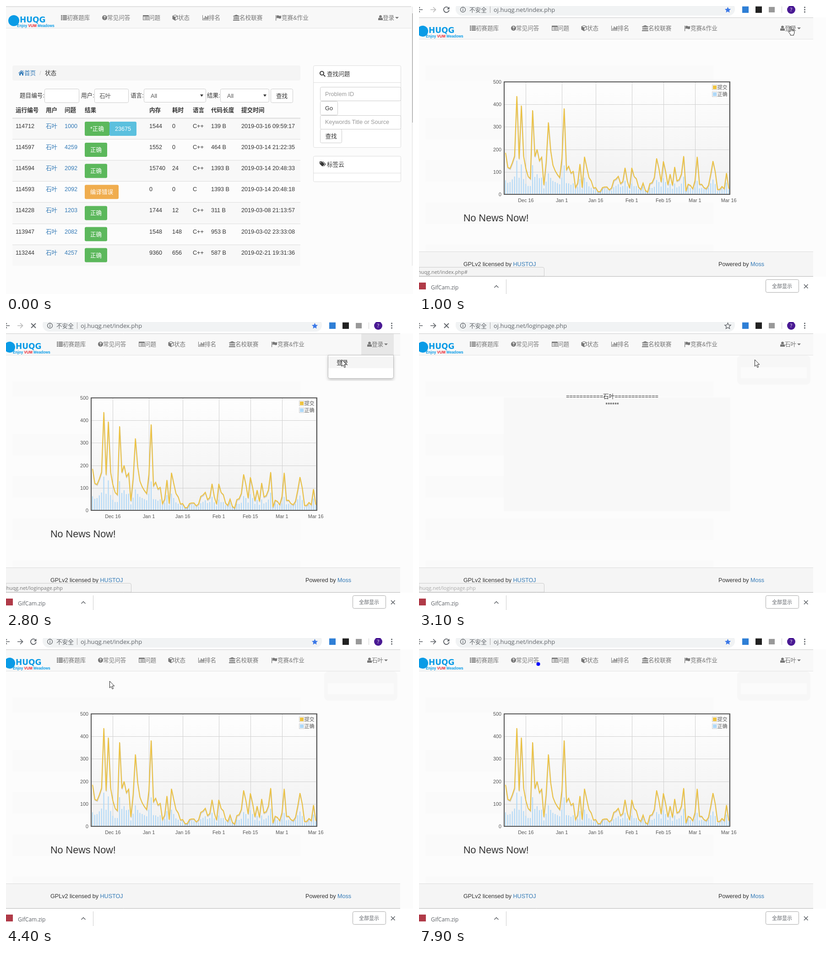
Recreate the animation shown at these times as an HTML page. Size 889 px wide and 630 px high, loop 8000 ms.

```html
<!DOCTYPE html>
<html lang="zh">
<head>
<meta charset="utf-8">
<title>Online judge</title>
<style>
html, body { margin: 0; width: 100%; height: 100%; overflow: hidden; background: #fcfcfc; }
svg { display: block; width: 889px; height: 630px; }
text { font: 12.6px "Liberation Sans", "Noto Sans CJK SC", "Noto Sans CJK", sans-serif; fill: #333; white-space: pre; }
.ui { font-family: "Open Sans", "Noto Sans CJK SC", "Noto Sans CJK", sans-serif; fill: #5f6368; }
.nav text, .nav path { fill: #777; }
.link { fill: #337ab7; }
.axis { font-size: 10.8px; fill: #545454; }
.pointer { animation: point 8s infinite; }
.dot { animation: roam 8s infinite; }
@keyframes point {
  0%, 5% { transform: translate(832px, 150px); animation-timing-function: steps(6); }
  12.5%, 13.75% { transform: translate(806px, 44px); animation-timing-function: steps(5); }
  20% { transform: translate(802px, 94px); animation-timing-function: steps(2); }
  22.5% { transform: translate(729px, 81px); animation-timing-function: step-end; }
  25% { transform: translate(733px, 82px); animation-timing-function: step-end; }
  40% { transform: translate(733px, 84px); animation-timing-function: step-end; }
  43.75% { transform: translate(733px, 84px); animation-timing-function: steps(4); }
  48.75% { transform: translate(351px, 142px); animation-timing-function: steps(3); }
  52.5% { transform: translate(167px, 106px); animation-timing-function: steps(2); }
  55%, 56.25% { transform: translate(226px, 94px); animation-timing-function: steps(3); }
  60%, to { transform: translate(241px, 88px); }
}
@keyframes roam {
  0%, 83.75% { transform: translate(243px, 89px); animation-timing-function: steps(9); }
  95% { transform: translate(288px, 66px); animation-timing-function: steps(3); }
  98.75%, to { transform: translate(260.5px, 57px); }
}
</style>
</head>
<body>
<svg id="stage" viewBox="0 0 889 630"></svg>
<script>
const LOOP = 8000, USER = '石叶', HOST = 'oj.huqg.net';
const rules = new Set();

const text = (x, y, s, attrs = '') => `<text x="${x}" y="${y}" ${attrs}>${s}</text>`;
const rect = (x, y, w, h, fill, attrs = '') =>
  `<rect x="${x}" y="${y}" width="${w}" height="${h}" fill="${fill}" ${attrs}/>`;
const path = (d, attrs) => `<path d="${d}" ${attrs}/>`;
const line = (d, color, w = 1) => path(d, `fill="none" stroke="${color}" stroke-width="${w}"`);
const box = (x, y, w, h, r = 3, color = '#ccc') =>
  rect(x + .5, y + .5, w - 1, h - 1, '#fff', `rx="${r}" stroke="${color}"`);
const move = (x, y, s) => `<g transform="translate(${x} ${y})">${s}</g>`;

// Shows its content only from one time to another, in ms.
function during(from, to, s) {
  const name = `on${from}to${to}`, pct = ms => ms / LOOP * 100 + '%';
  rules.add(`@keyframes ${name}{0%{opacity:0}${pct(from)}{opacity:1}${pct(to)}{opacity:0}to{opacity:0}}`);
  return `<g style="animation:${name} ${LOOP}ms step-end infinite">${s}</g>`;
}

const icons = {
  list: [1, 4, 7, 10].map(y => `M0 ${y}h3v2H0zm4 0h9v2H4z`).join(''),
  help: 'M5.5 1a5.5 5.5 0 1 0 .01 0zM3.3 5q0-2.5 2.2-2.5T7.7 4.4q0 1-1.4 1.7v1H4.8V5.6q1.4-.6 1.4-1.2t-.7-.6-.7 1.2zM4.8 8h1.5v1.6H4.8z',
  table: 'M0 1h13v11H0zM1 4v7h11V4z' + [5, 7, 9].map(y => `M2 ${y}h1v1H2zm2 0h7v1H4z`).join(''),
  cube: 'M6.5 0l6 2.5v7l-6 3.5-6-3.5v-7zM6.5 1.2L2.2 3l4.3 1.8L10.8 3zM7.2 6v5.3l4-2.3V4.3z',
  bars: 'M0 1h1v10h13v1H0zM2.5 7h2v3h-2zM5.5 3h2v7h-2zM8.5 5h2v5h-2zM11.3 2h2v8h-2z',
  bank: 'M7 0l7 3v1H0V3zM1.5 5h2v5h-2zM4.7 5h2v5h-2zM7.6 5h2v5h-2zM10.6 5h2v5h-2zM0 11h14v2H0z',
  flag: 'M0 1h1.2v12H0zM2 2q2.5-1.5 5 0t5-.2v6q-2.5 1.5-5 .2T2 8z',
  user: 'M5 1a3 3 0 1 1-.01 0zM0 12V9q0-2.5 2.2-2.5 2.8 1.8 5.6 0Q10 6.5 10 9v3z',
  home: 'M6.5.5L13 6.7l-.8.8-5.7-5.3L.8 7.5 0 6.7zM2 7.5l4.5-4.2L11 7.5V12H8V8.5H5V12H2zM9.5 1.2H11v2.6L9.5 2.3z',
  search: 'M5 0a5 5 0 1 1-.01 0zM5 1.8a3.2 3.2 0 1 0 .01 0zM8 9.3L9.3 8 13 11.6 11.6 13z',
  tags: 'M0 1h5l6 6-5 5-6-6zM2.4 2.4a1 1 0 1 0 .01 0zM6.5 1h1.3l6.2 6-5 5-.8-.8L12.4 7z'
};
const icon = (name, x, y, fill = '#333') =>
  move(x, y, path(icons[name], `fill="${fill}" fill-rule="evenodd"`));

const navItems = [
  ['list', 120, '初赛题库', 133], ['help', 210, '常见问答', 221], ['table', 299, '问题', 312],
  ['cube', 363, '状态', 376], ['bars', 429, '排名', 443], ['bank', 496, '名校联赛', 510],
  ['flag', 589, '竞赛&amp;作业', 602]
];
const nav = () => `<g class="nav">${navItems.map(([n, ix, s, x]) => icon(n, ix, 19) + text(x, 30, s)).join('')}</g>`
  + '<circle cx="17" cy="32" r="12" fill="#0a9be6"/>'
  + text(30, 36, 'HUQG', 'style="font:bold 17px DejaVu Sans,sans-serif;fill:#0a9be6"')
  + text(24, 46, 'Enjoy <tspan fill="#e8202a">VUM</tspan> Meadows', 'style="font-size:8.2px;font-weight:bold;fill:#0a9be6"');
const account = s => `<g class="nav">${icon('user', 813, 19) + text(823, 30, s) + path('M850 24h8l-4 4z', '')}</g>`;
const navBar = (y, w) => rect(0, y, w, 48, '#f8f8f8') + line(`M0 ${y + .5}H${w}`, '#ccc') + line(`M0 ${y + 47.5}H${w}`, '#e4e4e4');

// Status list
function statusPage() {
  const button = (x, y, w, s, fill) => rect(x, y, w, 31, fill, 'rx="3"')
    + text(x + w / 2, y + 20, s, 'text-anchor="middle" style="fill:#fff"');
  const plain = (x, y, w, s) => box(x, y, w, 31) + text(x + w / 2, y + 20, s, 'text-anchor="middle"');
  const select = (x, w) => box(x, 181, w, 30) + text(x + 15, 201, 'All', 'style="fill:#555"')
    + path(`M${x + w - 13} 193.5h7l-3.5 5z`, 'fill="#333"');
  const cols = [21, 87, 128, 172, 313, 363, 408, 448, 514];
  const heads = ['运行编号', '用户', '问题', '结果', '内存', '耗时', '语言', '代码长度', '提交时间'];
  const rows = [
    '114712|1000|1544|0|C++|139 B|2019-03-16 09:59:17', '114597|4259|1552|0|C++|464 B|2019-03-14 21:22:35',
    '114594|2092|15740|24|C++|1393 B|2019-03-14 20:48:33', '114593|2092|0|0|C|1393 B|2019-03-14 20:48:18',
    '114228|1203|1744|12|C++|311 B|2019-03-08 21:13:57', '113947|2082|1548|148|C++|953 B|2019-03-02 23:33:08',
    '113244|4257|9360|656|C++|587 B|2019-02-21 19:31:36'
  ];
  const row = (r, i) => {
    const [id, task, ...rest] = r.split('|'), y = 245 + i * 46.1;
    const result = i === 0 ? button(172, 253, 54, '*正确', '#5cb85c') + button(226, 253, 59, '23675', '#5bc0de')
      : i === 3 ? button(172, y + 8, 74, '编译错误', '#f0ad4e') : button(172, y + 8, 49, '正确', '#5cb85c');
    return (i % 2 ? '' : rect(14, y, 629, i < 6 ? 46 : 46.4, '#f8f8f8'))
      + line(`M14 ${Math.round(y) + .5}H643`, '#ddd', i ? 1 : 2)
      + text(21, y + 22, id) + text(87, y + 22, USER, 'class="link"') + text(128, y + 22, task, 'class="link"')
      + result + rest.map((s, k) => text(cols[k + 4], y + 22, s)).join('');
  };
  const panel = (y, h) => box(671, y, 192, h, 3, '#ddd') + line(`M671 ${y + 37.5}H863`, '#ddd');
  const hint = 'style="fill:#999"';
  return rect(0, 0, 889, 630, '#fcfcfc') + navBar(1, 885) + nav() + account('登录')
    + rect(886, 2, 3, 566, '#f1f1f1') + rect(887, 16, 2, 239, '#c1c1c1')
    + rect(14, 130, 629, 33, '#f5f5f5', 'rx="4"') + icon('home', 27, 140, '#337ab7')
    + text(40, 151, '首页', 'class="link"') + text(73, 151, '/', 'style="fill:#ccc"') + text(85, 151, '状态')
    + text(30, 200, '题目编号:') + box(84, 181, 76, 31) + text(164, 200, '用户:') + box(193, 181, 75, 31)
    + text(204, 201, USER, 'style="fill:#555"') + text(272, 200, '语言:') + select(301, 136)
    + text(439, 200, '结果:') + select(468, 107) + plain(578, 181, 49, '查找')
    + heads.map((s, i) => text(cols[i], 232, s, 'font-weight="bold" style="font-weight:bold"')).join('')
    + rows.map(row).join('')
    + panel(130, 180) + icon('search', 685, 142) + text(701, 153, '查找问题')
    + box(686, 177, 177, 31) + text(697, 197, 'Problem ID', hint) + plain(686, 208, 39, 'Go')
    + box(686, 239, 177, 31) + text(697, 258, 'Keywords Title or Source', hint) + plain(686, 269, 48, '查找')
    + panel(328, 57) + icon('tags', 685, 339) + text(701, 351, '标签云');
}

// Submissions chart
const daily = [
  185, 120, 115, 140, 170, 437, 158, 395, 170, 115, 80, 70, 374, 168, 200, 150, 165, 42, 140, 320,
  195, 130, 105, 88, 75, 160, 382, 110, 125, 95, 102, 30, 50, 135, 30, 167, 120, 75, 60, 28,
  30, 12, 12, 30, 33, 33, 20, 28, 62, 68, 80, 48, 57, 118, 60, 28, 118, 80, 70, 32,
  22, 50, 18, 10, 48, 52, 75, 160, 115, 55, 147, 100, 42, 90, 40, 122, 60, 65, 90, 170,
  15, 45, 40, 25, 60, 167, 45, 45, 30, 25, 40, 90, 148, 100, 22, 22, 35, 25, 95, 25
];
function chart() {
  const px = day => +(189 + day * 4.925).toFixed(1), py = v => +(412 - v * .492).toFixed(1);
  const curve = 'M' + daily.map((v, i) => `${px(i)} ${py(v)}`).join('L');
  const accepted = daily.map((v, i) => {
    const jitter = .85 + .3 * Math.abs(Math.sin(i * 12.9));
    return `M${px(i)} 412V${py(Math.min(150, 1.9 * v ** .7 * jitter))}`;
  }).join('');
  const days = [['Dec 16', 9], ['Jan 1', 25], ['Jan 16', 40], ['Feb 1', 56], ['Feb 15', 70], ['Mar 1', 84], ['Mar 16', 99]];
  const key = (y, s, fill) => rect(640.5, y + .5, 11, 11, '#fff', 'stroke="#ccc"') + rect(642, y + 2, 8, 8, fill)
    + text(652, y + 10, s, 'class="axis"');
  return rect(186, 166, 493, 246, 'url(#shade)')
    + days.map(([s, d]) => line(`M${Math.round(px(d)) + .5} 167V411`, '#d0d0d0')
      + text(px(d), 429, s, 'class="axis" text-anchor="middle"')).join('')
    + [0, 100, 200, 300, 400, 500].map(v => line(`M187 ${Math.round(py(v)) + .5}H678`, '#d0d0d0')
      + text(180, py(v) + 4, v, 'class="axis" text-anchor="end"')).join('')
    + line(accepted, '#afd8f8', 2)
    + move(.7, 2, line(curve, 'rgba(0,0,0,.15)', 2)) + line(curve, '#edc240', 2)
    + rect(186, 166, 493, 246, 'none', 'stroke="#545454" stroke-width="2"')
    + rect(639, 171, 37, 30, '#fff', 'opacity=".85"') + key(172, '提交', '#edc240') + key(187, '正确', '#afd8f8')
    + text(97, 471, 'No News Now!', 'style="font-size:21.6px"');
}

// Browser frame
function toolbar() {
  const arrow = (x, dir, color) => line(`M${x - 6 * dir} 8H${x + 5 * dir}M${x} 2.5L${x + 5.5 * dir} 8L${x} 13.5`, color, 1.7);
  const url = page => text(163, 13, `${HOST}/${page}`, 'class="ui" style="font-size:13px"');
  const star = 'M674.5 2l1.9 4.3 4.7.5-3.5 3.1 1 4.6-4.1-2.4-4.1 2.4 1-4.6-3.5-3.1 4.7-.5z';
  const index = s => during(100, 3100, s) + during(3400, LOOP, s);
  const reload = line('M64.5 4.2A6 6 0 1 0 65.8 9', '#5f6368', 1.8) + path('M66.5 1.5v5.7h-5.7z', 'fill="#5f6368"');
  return rect(0, 0, 889, 25, '#fff') + rect(80, -8, 610, 29, '#f1f3f4', 'rx="14"')
    + arrow(2, -1, '#5f6368') + during(100, 3100, arrow(31, 1, '#bbb')) + during(3100, LOOP, arrow(31, 1, '#5f6368'))
    + during(100, 2800, reload) + during(3900, LOOP, reload)
    + during(2800, 3900, line('M55 3l10 10M65 3l-10 10', '#5f6368', 1.8))
    + '<circle cx="96" cy="8" r="5.5" fill="none" stroke="#5f6368" stroke-width="1.3"/>' + line('M96 7v4M96 4.6v1.5', '#5f6368', 1.4)
    + text(110, 13, '不安全', 'class="ui" style="font-size:12.6px"') + line('M155.5 1v14', '#aaa')
    + index(url('index.php') + path(star, 'fill="#3b78e7"'))
    + during(3100, 3400, url('loginpage.php') + line(star, '#5f6368', 1.3))
    + rect(706, 1, 14, 14, '#2f7fd6') + rect(735, 1, 14, 14, '#222') + rect(764, 2, 13, 12, '#999')
    + line('M792.5 1v14', '#ccc') + '<circle cx="813" cy="8" r="9" fill="#4a1a94"/>'
    + text(813, 12, '?', 'class="ui" text-anchor="middle" style="font-size:10px;fill:#fff"')
    + [3, 8, 13].map(y => `<circle cx="842.5" cy="${y}" r="1.6" fill="#5f6368"/>`).join('');
}
const downloads = () => rect(0, 592, 889, 38, '#fff') + line('M0 591.5H861', '#b5b5b5') + rect(0, 605, 15, 15, '#b03a48')
  + text(26, 620, 'GifCam.zip', 'class="ui" style="font-size:12px"') + line('M164.5 616l4.5-4.5 4.5 4.5', '#5f6368', 1.5)
  + line('M190.5 598V630', '#ccc') + box(757, 598, 73, 29, 3, '#aaa')
  + text(793, 617, '全部显示', 'class="ui" text-anchor="middle" style="font-size:11px"')
  + line('M841 609l8.5 8.5M849.5 609l-8.5 8.5', '#5f6368', 1.6);
const status = (x, s, color) => path('M0 571.5H270q3.5 0 3.5 3.5V591H0z', 'fill="#f4f4f4" stroke="#ccc"')
  + text(x, 586, s, `class="ui" text-anchor="end" style="font-size:11px;fill:${color}"`);

function homePage() {
  const menu = rect(776, 26, 71, 46, '#e7e7e7') + move(-24, 23, account('登录'))
    + path('M703.5 72.5h143v47q0 4-4 4h-135q-4 0-4-4z', 'fill="#fff" stroke="#bbb" filter="url(#drop)"')
    + rect(704, 76, 142, 25, '#f5f5f5') + text(722, 93, '登录');
  const ghost = rect(695, 73, 160, 64, '#f7f7f7', 'rx="9"') + rect(703, 99, 144, 24, '#fbfbfb');
  return rect(0, 0, 889, 630, '#fcfcfc')
    + [130, 245, 337, 430].map(y => rect(14, y, 629, y > 130 ? 47 : 33, '#fafafa')).join('') + rect(14, 522, 629, 15, '#fafafa')
    + toolbar() + navBar(25, 861) + move(-9, 23, nav())
    + during(100, 3100, move(-24, 23, account('登录'))) + during(3100, LOOP, move(-24, 23, account(USER)))
    + during(2900, LOOP, ghost)
    + during(100, 3100, chart()) + during(3400, LOOP, chart())
    + during(3100, 3400, rect(185, 165, 495, 249, '#f8f8f8')
      + text(422, 167, `===========${USER}=============`, 'text-anchor="middle"') + text(422, 185, '******', 'text-anchor="middle"'))
    + rect(0, 537, 861, 54, '#f5f5f5') + line('M0 537.5H861', '#ddd')
    + text(97, 569, 'GPLv2 licensed by <tspan class="link">HUSTOJ</tspan>')
    + text(654, 569, 'Powered by <tspan class="link">Moss</tspan>')
    + during(1000, 1500, status(106, HOST + '/index.php#', '#777'))
    + during(1500, 3100, status(124, HOST + '/loginpage.php', '#777'))
    + during(3100, 3400, status(124, HOST + '/loginpage.php', '#aaa'))
    + during(3400, 4000, status(135, `正在等待 ${HOST} 的响应...`, '#777'))
    + downloads() + during(1300, 2900, menu);
}

const arrowCursor = path('M.5.5V15l3.3-3 2.4 5.6 2.3-1L6.1 11h4.6z', 'fill="#fff" stroke="#222"');
const handCursor = path('M4.5 12V2q0-1.5 1.3-1.5T7 2v5.5q2-.8 2.4.7 2-.6 2.3.8 2.2-.4 2.2 1.3V14q0 2.5-1.4 4v2H5.2v-2L1 12.5q-.8-1.6.6-2 1.2-.2 2.9 2z', 'fill="#fff" stroke="#222"')
  + line('M7 7.5v3.5M9.4 8.2v3M11.7 9v2.5', '#222');

document.getElementById('stage').innerHTML =
  `<defs><linearGradient id="shade" x2="0" y2="1"><stop stop-color="#fefefe"/><stop offset="1" stop-color="#f1f1f1"/></linearGradient>
  <filter id="drop"><feDropShadow dx="0" dy="3" stdDeviation="3" flood-opacity=".2"/></filter></defs>`
  + during(0, 100, statusPage()) + during(100, LOOP, homePage())
  + `<g class="pointer">${during(400, 1000, arrowCursor) + during(1000, 2000, handCursor) + during(2000, 5900, arrowCursor)}</g>`
  + during(6000, LOOP, '<circle class="dot" r="4" fill="#00f"/>');
document.head.appendChild(document.createElement('style')).textContent = [...rules].join('\n');
</script>
</body>
</html>
```
